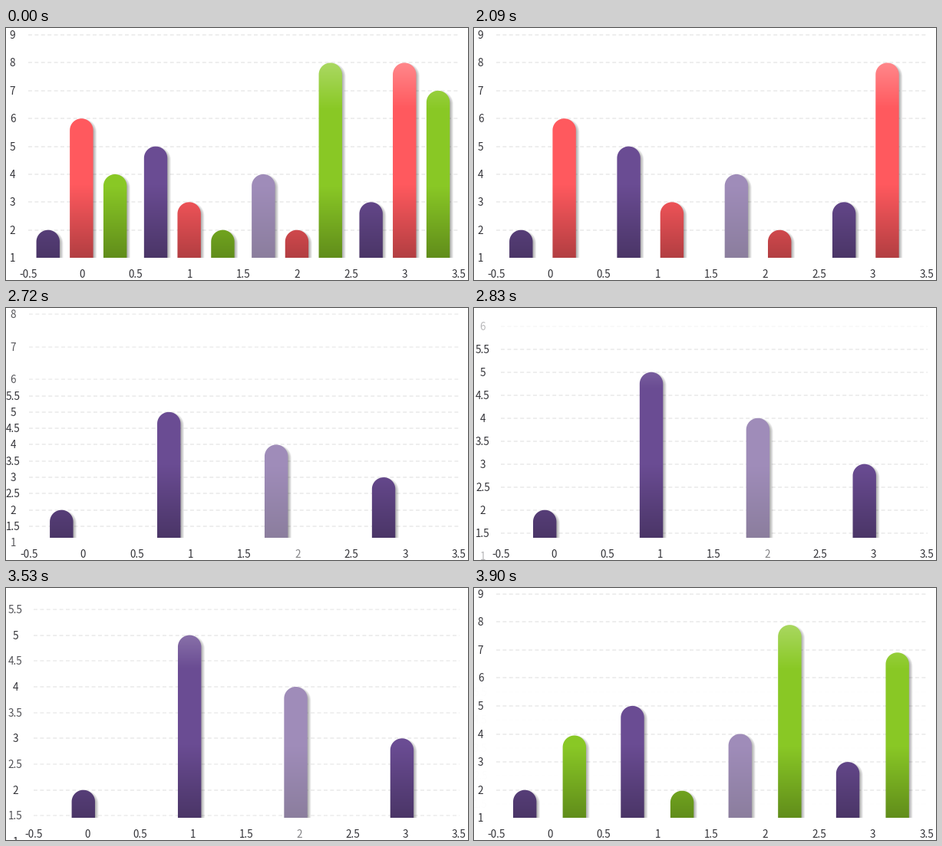
A matplotlib script for the animation above (5900 ms loop, 602 by 329 pixels).

```python
import numpy as np
import matplotlib.pyplot as plt
from matplotlib.animation import FuncAnimation
from matplotlib.colors import to_rgb
from matplotlib.patches import PathPatch, Rectangle
from matplotlib.path import Path

WIDTH, HEIGHT, DPI = 602, 329, 64
LOOP, INTERVAL = 5900, 20
PX = 72 / DPI
BASE, RIGHT, RADIUS = 300, 590, 15.2

PURPLE, RED, GREEN = "#6A4C93", "#FF595E", "#8AC926"
VALUES = {"purple": (2, 5, 4, 3), "red": (6, 3, 2, 8), "green": (4, 2, 8, 7)}

# start, step and length of each transition in ms
HIDE_GREEN = (2000, 30, 220)
HIDE_RED = (2720, 36, 310)
SHOW_GREEN = (3530, 30, 370)


def elapsed(t, start, step, length):
    d = t - start
    return length if d >= length else d // step * step


def ease_out(d):
    return 1 - (1 - min(0.09 + d / 340, 1)) ** 2


def state(t):
    """Zoom of the axes, fade of old ticks and (offset, growth) per series."""
    if t < HIDE_GREEN[0]:
        return 0, 0, {"purple": (-44.2, 1), "red": (-0.6, 1), "green": (43.2, 1)}
    if t < HIDE_RED[0]:
        p = ease_out(elapsed(t, *HIDE_GREEN))
        return 0, 0, {"purple": (-44.2 + 11.2 * p, 1), "red": (-0.6 + 33 * p, 1)}
    if t < SHOW_GREEN[0]:
        p = ease_out(elapsed(t, *HIDE_RED))
        return p, 1 - p, {"purple": (-33.8 * (1 - p), 1)}
    d = elapsed(t, *SHOW_GREEN)
    left = np.exp(-0.16 - d / 75)
    growth = 1 - np.exp(-max(d - 21, 0) / 81.6)
    return left, left, {"purple": (-33 * (1 - left), 1), "green": (31.8, growth)}


def bar_path(x, top, dx=0, dy=0, grow=0):
    r = RADIUS + grow
    a = np.linspace(np.pi, 0, 40)
    xs = x + dx + r * np.cos(a)
    ys = top + dy + RADIUS - r * np.sin(a)
    floor = HEIGHT + 60
    verts = [(xs[0], floor), *zip(xs, ys), (xs[-1], floor), (xs[0], floor)]
    return Path(verts, closed=True)


fig = plt.figure(figsize=(WIDTH / DPI, HEIGHT / DPI), dpi=DPI, facecolor="white")
ax = fig.add_axes([0, 0, 1, 1])
ax.axis("off")


def gradient_image(color, opacity=1):
    """Vertical shading tied to the plot: pale at the top, dark at the base."""
    y = np.arange(BASE)[:, None] + 0.5
    light = np.interp(y, [9, 105], [0.45, 0])
    dark = np.interp(y, [205, BASE], [1, 0.7])
    rgb = np.array(to_rgb(color)) * (1 - light) + light
    rgb = rgb * dark * opacity + 1 - opacity
    return ax.imshow(rgb[:, None, :], extent=(0, WIDTH, BASE, 0), aspect="auto",
                     interpolation="nearest", zorder=3)


fills = {
    "purple": gradient_image(PURPLE),
    "pale": gradient_image(PURPLE, 0.64),
    "red": gradient_image(RED),
    "green": gradient_image(GREEN),
}
ax.set_xlim(0, WIDTH)
ax.set_ylim(HEIGHT, 0)

plot_area = Rectangle((0, 0), WIDTH, BASE, transform=ax.transData)
SHADOW_GROW = (-2, -1, 0, 1, 2)
shadows = []
for _ in SHADOW_GROW:
    patch = PathPatch(bar_path(0, 0), fc="black", ec="none", alpha=0.075, zorder=2)
    ax.add_patch(patch)
    patch.set_clip_path(plot_area)
    shadows.append(patch)


def label(value):
    return ax.text(0, 0, f"{value:g}", family="Noto Sans CJK JP", size=13.5 * PX,
                   color="#333338", ha="center", va="baseline", zorder=4)


y_ticks = np.arange(1, 9.5, 0.5)
x_ticks = np.arange(-0.5, 4, 0.5)
y_labels = [label(v) for v in y_ticks]
x_labels = [label(v) for v in x_ticks]
grid = [ax.plot([], [], color="#E9E9E9", lw=1.5 * PX, zorder=1,
                linestyle=(0, (3.3, 2.3)), dash_capstyle="butt")[0] for _ in y_ticks]


def tick_alpha(v, t, fade):
    whole = v == int(v)
    if t < HIDE_RED[0]:
        return float(whole)
    if t < SHOW_GREEN[0]:
        return 1.0 if 1.5 <= v <= 5.5 else fade * whole
    return 1.0 if whole else fade * (v <= 5.5)


def update(frame):
    t = frame * INTERVAL + INTERVAL // 2
    zoom, fade, series = state(t)
    left = 28.8 + 9 * zoom
    scale = 36.375 * (1 + zoom)

    def to_x(v):
        return left + (RIGHT - left) / 4 * (v + 0.5)

    def to_y(v):
        return 263.7 - scale * (v - 2)

    for v, text, line in zip(y_ticks, y_labels, grid):
        y, alpha = to_y(v), tick_alpha(v, t, fade)
        text.set_position((8.5 + 4.5 * zoom, y + 5))
        text.set_alpha(alpha)
        line.set_data([left, RIGHT + 1], [y, y])
        line.set_alpha(alpha)
        line.set_visible(alpha > 0 and 5 < y < 299)

    for v, text in zip(x_ticks, x_labels):
        text.set_position((to_x(v), 326))
        text.set_alpha(0.6 if v == 2 and HIDE_RED[0] <= t < 3560 else 1)

    bars = {name: [] for name in fills}
    for name, (offset, growth) in series.items():
        for i, v in enumerate(VALUES[name]):
            key = "pale" if name == "purple" and i == 2 else name
            top = min(to_y(v * growth), HEIGHT + 30)
            bars[key].append((to_x(i) + offset, top))

    for name, image in fills.items():
        image.set_visible(bool(bars[name]))
        if bars[name]:
            shape = Path.make_compound_path(*(bar_path(*b) for b in bars[name]))
            image.set_clip_path(shape, ax.transData)

    every_bar = sum(bars.values(), [])
    for grow, patch in zip(SHADOW_GROW, shadows):
        patch.set_path(Path.make_compound_path(
            *(bar_path(*b, 2.5, 2.5, grow) for b in every_bar)))
    return []


anim = FuncAnimation(fig, update, frames=LOOP // INTERVAL, interval=INTERVAL,
                     init_func=lambda: update(0), repeat=True, repeat_delay=0)
plt.show()
```
